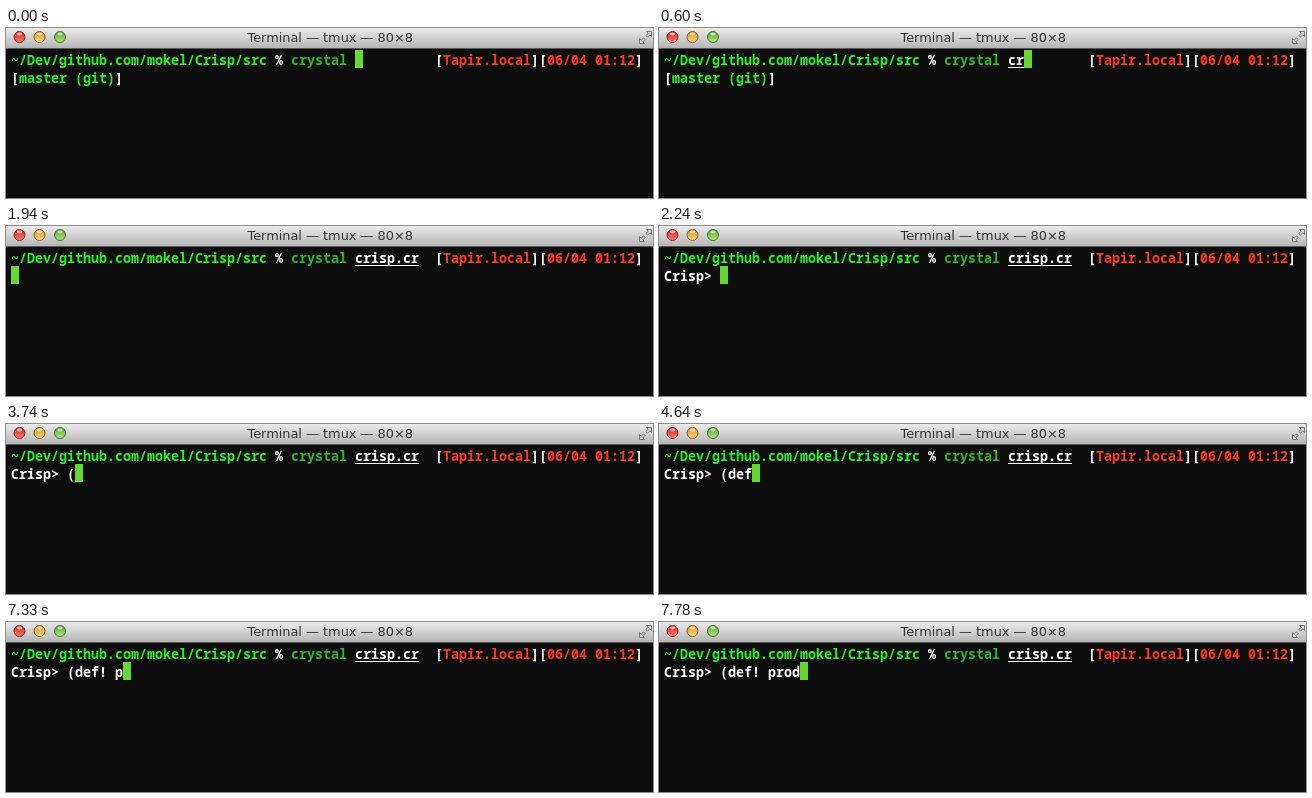
Animation of 647 by 170 pixels, one loop 8000 ms. Source, as an HTML page with a canvas:

```html
<!DOCTYPE html>
<html lang="en">
<head>
<meta charset="utf-8">
<title>Terminal</title>
<style>
  html, body { margin: 0; width: 100%; height: 100%; overflow: hidden; background: #0d0d0d; }
  canvas { display: block; }
</style>
</head>
<body>
<canvas id="stage" width="647" height="170"></canvas>
<script>
const ctx = document.getElementById('stage').getContext('2d');
const LOOP = 8000, CELL = 8, LINE = 18, LEFT = 5, TOP = 22;
const GREEN = '#27f427', DIM = '#2fb52f', RED = '#ff3a1d', WHITE = '#ffffff', CURSOR = '#66d930';

// Each entry: [time, text typed so far]
const fileTyping = [[0, ''], [450, 'c'], [600, 'cr'], [750, 'cri'], [900, 'crisp.cr ']];
const replTyping = [
  [1940, ''], [2240, 'Crisp> '], [3740, 'Crisp> ('], [4190, 'Crisp> (d'],
  [4490, 'Crisp> (de'], [4640, 'Crisp> (def'], [5540, 'Crisp> (def!'],
  [6430, 'Crisp> (def! '], [7330, 'Crisp> (def! p'], [7480, 'Crisp> (def! pr'],
  [7630, 'Crisp> (def! pro'], [7780, 'Crisp> (def! prod']
];
const typedAt = (steps, t) => steps.filter(([start]) => start <= t).pop()[1];

// Draws [text, colour, weight] runs on the character grid; returns the next column.
function write(col, row, ...runs) {
  for (const [text, color, weight = 700] of runs) {
    ctx.font = `${weight} 13.333px "Noto Sans Mono", monospace`;
    ctx.fillStyle = color;
    ctx.fillText(text, LEFT + col * CELL, TOP + row * LINE + 15);
    col += text.length;
  }
  return col;
}

function drawCursor(col, row) {
  ctx.fillStyle = CURSOR;
  ctx.fillRect(LEFT + col * CELL, TOP + row * LINE, CELL, LINE);
}

function drawButton(x, light, dark, rim) {
  const fill = ctx.createLinearGradient(0, 3, 0, 15);
  fill.addColorStop(0, dark);
  fill.addColorStop(1, light);
  ctx.beginPath();
  ctx.arc(x, 9, 5.5, 0, 7);
  ctx.fillStyle = fill;
  ctx.fill();
  ctx.strokeStyle = rim;
  ctx.lineWidth = 1;
  ctx.stroke();
  ctx.beginPath();
  ctx.ellipse(x, 6, 2.6, 1.4, 0, 0, 7);
  ctx.fillStyle = 'rgba(255,255,255,.65)';
  ctx.fill();
}

function drawTitleBar() {
  const bar = ctx.createLinearGradient(0, 0, 0, 20);
  bar.addColorStop(0, '#ebebeb');
  bar.addColorStop(1, '#b5b5b5');
  ctx.fillStyle = bar;
  ctx.fillRect(0, 0, 647, 20);
  ctx.fillStyle = '#5a5a5a';
  ctx.fillRect(0, 20, 647, 1);

  drawButton(13.5, '#ff7a6e', '#c9281f', '#84241f');
  drawButton(33.5, '#ffe083', '#d38a22', '#8a5f20');
  drawButton(54, '#b8ee88', '#539a2e', '#42701f');

  ctx.font = '12.9px "DejaVu Sans", sans-serif';
  ctx.fillStyle = '#333333';
  ctx.textAlign = 'center';
  ctx.fillText('Terminal — tmux — 80×8', 324.2, 14);
  ctx.textAlign = 'left';

  const arrows = new Path2D('M640.5 3.5h5v5l-1.7-1.7-2.3 2.3-1.6-1.6 2.3-2.3z' +
    'M638.5 15.5h-5v-5l1.7 1.7 2.3-2.3 1.6 1.6-2.3 2.3z');
  ctx.fillStyle = '#d8d8d8';
  ctx.strokeStyle = '#747474';
  ctx.lineWidth = 1;
  ctx.fill(arrows);
  ctx.stroke(arrows);
}

function draw(t) {
  ctx.fillStyle = '#0d0d0d';
  ctx.fillRect(0, 0, 647, 170);
  drawTitleBar();

  const file = typedAt(fileTyping, t), name = file.trim();
  const start = write(0, 0, ['~/Dev/github.com/mokel/Crisp/src', GREEN],
    [' % ', WHITE], ['crystal ', DIM, 600]);
  const end = write(start, 0, [file, WHITE, 600]);
  ctx.fillRect(LEFT + start * CELL, TOP + 17, name.length * CELL, 1);
  write(53, 0, ['[', WHITE], ['Tapir.local', RED], ['][', WHITE],
    ['06/04 01:12', RED], [']', WHITE]);

  if (t < 1940) {
    write(0, 1, ['[', WHITE], ['master (git)', GREEN], [']', WHITE]);
    drawCursor(end, 0);
  } else {
    drawCursor(write(0, 1, [typedAt(replTyping, t), WHITE]), 1);
  }
}

function tick() {
  draw(performance.now() % LOOP);
  requestAnimationFrame(tick);
}
tick();
</script>
</body>
</html>
```
